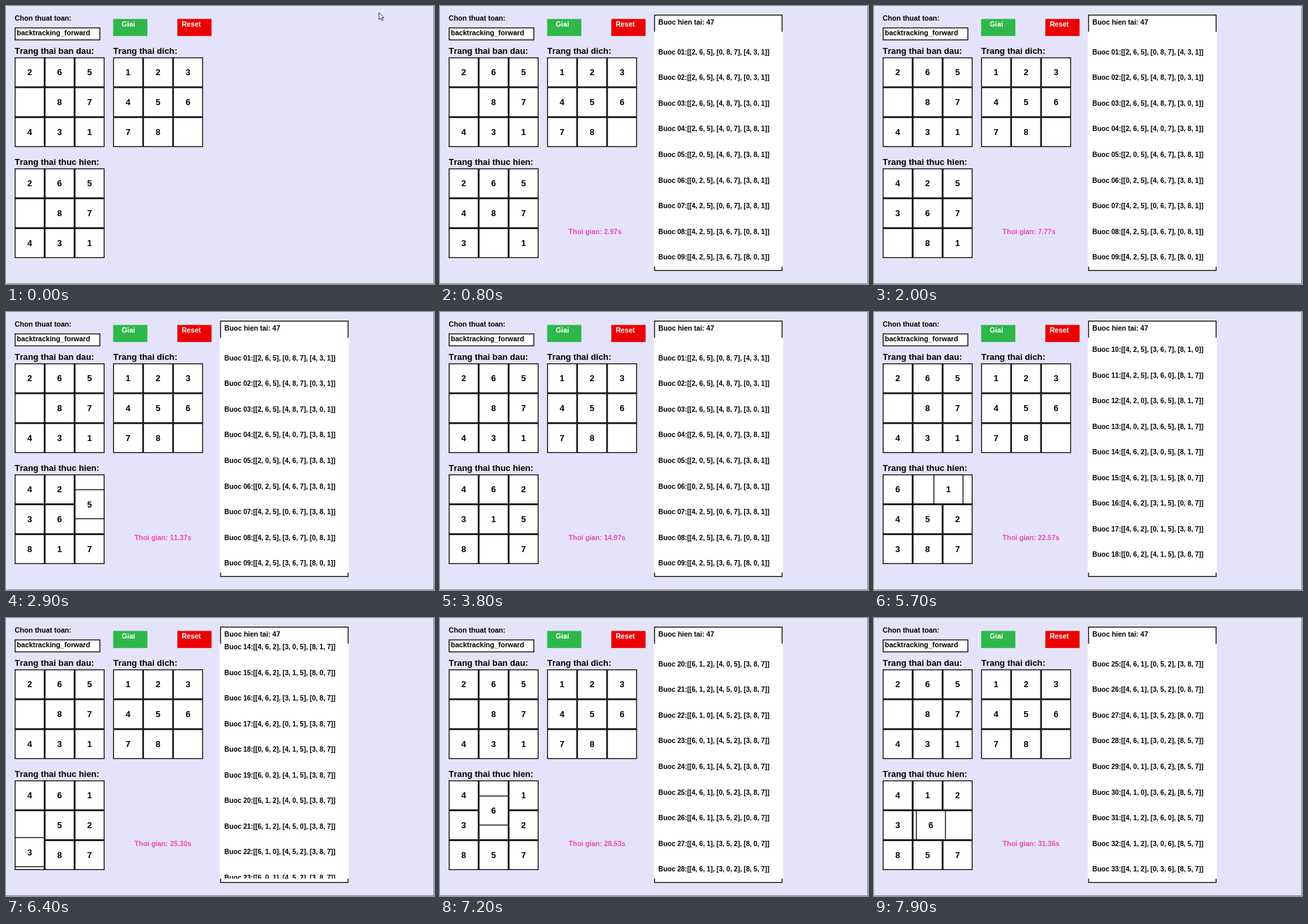
Write an HTML page that moves like this. It is 642x418 px and loops after 8000 ms.

```html
<!DOCTYPE html>
<html lang="vi">
<head>
<meta charset="utf-8">
<title>8-puzzle</title>
<style>
  html, body { margin: 0; width: 100%; height: 100%; overflow: hidden; background: #e5e3f9; }
  svg { display: block; width: 642px; height: 418px; }
  text { font-family: "Liberation Sans", Arial, sans-serif; font-weight: 700; font-kerning: none; white-space: pre; }
</style>
</head>
<body>
<svg id="stage" viewBox="0 0 642 418">
  <defs><clipPath id="listClip"><rect x="500" y="60" width="300" height="550"/></clipPath></defs>
  <rect width="642" height="418" fill="#e5e3f9"/>
  <g id="app" transform="translate(.2 .2) scale(.642)"></g>
  <path d="M641.5 0V417.5H0" fill="none" stroke="#85858f"/>
  <path id="cursor" d="M0 0V10.5L2.5 8.2L4.3 12L6 11.2L4.3 7.6H7.5Z" fill="#fff" stroke="#222" stroke-width=".9"/>
</svg>
<script>
const LOOP = 8000, TICK = 100, CELL = 70, ROW = 60, WHEEL = 20;
const SLIDE = 0.5; // seconds a tile takes to slide
const START = '265087431', GOAL = '123456780';
const MOVES = 'DRUULDDRRUULDDLUURDRULLDDRUURDLL';
const OFFSET = { U: -3, D: 3, L: -1, R: 1 };

// [loop ms, solver clock in s], [loop ms, wheel clicks]
const CLOCK = [[0, -.23], [2000, 7.77], [3800, 14.97], [4900, 19.39], [5700, 22.57], [6400, 25.3], [7900, 31.36]];
const SCROLL = [[4500, 0], [4900, 17], [5700, 28], [6400, 41], [7900, 72]];

const slideStart = step => 0.02 + 1.0092 * step;

const app = document.getElementById('app');
const cursor = document.getElementById('cursor');

function add(parent, tag, attrs, content) {
  const el = document.createElementNS('http://www.w3.org/2000/svg', tag);
  for (const key in attrs) el.setAttribute(key, attrs[key]);
  if (content !== undefined) el.textContent = content;
  parent.append(el);
  return el;
}

const label = (parent, x, y, size, content, fill = '#000') =>
  add(parent, 'text', { x, y, 'font-size': size, fill }, content);

const fillBox = (parent, x, y, width, height, fill) =>
  add(parent, 'rect', { x, y, width, height, fill });

// White box whose 2px border lies inside its bounds
const frameBox = (parent, x, y, w, h) =>
  add(parent, 'rect', { x: x + 1, y: y + 1, width: w - 2, height: h - 2, fill: '#fff', stroke: '#000', 'stroke-width': 2 });

function makeTile(parent, x, y) {
  const g = add(parent, 'g', { transform: `translate(${x} ${y})` });
  frameBox(g, 0, 0, CELL, CELL);
  const digit = label(g, 35, 42.3, 20, '');
  digit.setAttribute('text-anchor', 'middle');
  return { g, digit };
}

const cellX = i => i % 3 * CELL;
const cellY = i => Math.floor(i / 3) * CELL;

function makeBoard(x, y, state) {
  const g = add(app, 'g', { transform: `translate(${x} ${y})` });
  const tiles = [...state].map((_, i) => makeTile(g, cellX(i), cellY(i)));
  const show = s => tiles.forEach((tile, i) => { tile.digit.textContent = s[i] === '0' ? '' : s[i]; });
  show(state);
  return { g, show };
}

function interpolate(points, x) {
  let i = 1;
  while (i < points.length - 1 && x > points[i][0]) i++;
  const [x0, y0] = points[i - 1], [x1, y1] = points[i];
  return y0 + (y1 - y0) * (x - x0) / (x1 - x0);
}

// Every board on the way, made by moving the blank
const states = [START];
for (const move of MOVES) {
  const cells = [...states[states.length - 1]];
  const blank = cells.indexOf('0'), other = blank + OFFSET[move];
  [cells[blank], cells[other]] = [cells[other], '0'];
  states.push(cells.join(''));
}

label(app, 20, 33.3, 16.6, 'Chon thuat toan:');
frameBox(app, 20, 50, 200, 30);
label(app, 25, 68.3, 16.5, 'backtracking_forward');
fillBox(app, 250, 30, 80, 40, '#2eb84a');
label(app, 270, 48.5, 16.6, 'Giai', '#fff');
fillBox(app, 400, 30, 80, 40, '#eb0000');
label(app, 410, 48.5, 16.6, 'Reset', '#fff');
label(app, 20, 111.4, 20, 'Trang thai ban dau:');
label(app, 250, 111.4, 20, 'Trang thai dich:');
label(app, 20, 371.4, 20, 'Trang thai thuc hien:');
makeBoard(20, 120, START);
makeBoard(250, 120, GOAL);
const board = makeBoard(20, 380, START);
const slider = makeTile(board.g, 0, 0);

const results = add(app, 'g', {});
const timer = label(results, 300, 533.6, 16.4, '', '#ee48b4');
frameBox(results, 500, 20, 300, 600);
fillBox(results, 499, 60, 302, 550, '#fff');
label(results, 510, 43.4, 16.3, 'Buoc hien tai: 47');
const list = add(add(results, 'g', { 'clip-path': 'url(#listClip)' }), 'g', {});
states.forEach((state, i) => {
  const rows = state.match(/.../g).map(r => `[${[...r].join(', ')}]`).join(', ');
  label(list, 510, 113.3 + i * ROW, 15.9, `Buoc ${String(i + 1).padStart(2, '0')}:[${rows}]`);
});

function drawBoard(clock) {
  let step = 0;
  while (step < MOVES.length && clock >= slideStart(step + 1)) step++;
  const state = states[step];
  const progress = step ? (clock - slideStart(step)) / SLIDE : 1;
  const sliding = progress < 1;
  slider.g.style.display = sliding ? '' : 'none';
  if (!sliding) return board.show(state);

  const from = state.indexOf('0'), to = states[step - 1].indexOf('0');
  const mix = (a, b) => a + (b - a) * progress;
  board.show(state.replace(state[to], '0'));
  slider.digit.textContent = state[to];
  slider.g.setAttribute('transform',
    `translate(${mix(cellX(from), cellX(to))} ${mix(cellY(from), cellY(to))})`);
}

function drawCursor(t) {
  const early = t < 300, late = t >= 4400 && t < 5200;
  cursor.style.display = early || late ? '' : 'none';
  cursor.setAttribute('transform', early ? 'translate(559.5 10)' : 'translate(501.8 155.8)');
}

function render(ms) {
  const t = Math.floor((ms % LOOP) / TICK + 1e-6) * TICK;
  const clock = interpolate(CLOCK, t);
  results.style.display = t < 100 ? 'none' : '';
  timer.textContent = `Thoi gian: ${clock.toFixed(2)}s`;
  const clicks = Math.max(0, Math.floor(interpolate(SCROLL, t) + 1e-6));
  list.setAttribute('transform', `translate(0 ${-clicks * WHEEL})`);
  drawBoard(clock);
  drawCursor(t);
}

const begin = performance.now();
function loop() {
  render(performance.now() - begin);
  requestAnimationFrame(loop);
}
loop();
</script>
</body>
</html>
```
